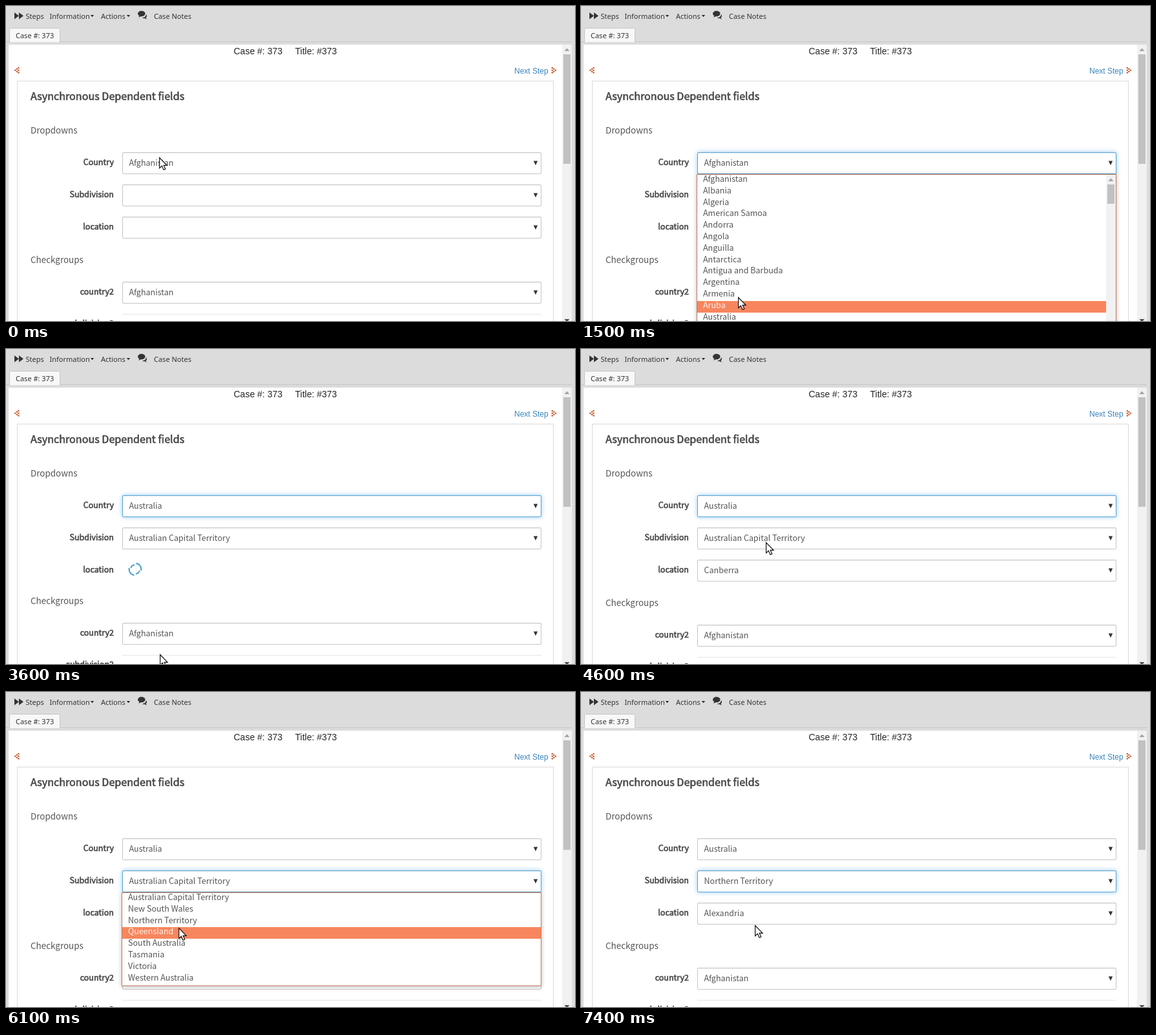
Write an HTML page that moves like this. It is 881x489 px and loops after 7800 ms.

```html
<!DOCTYPE html>
<html lang="en">
<head>
<meta charset="utf-8">
<title>Dependent fields</title>
<style>
  html, body { margin: 0; width: 100%; height: 100%; overflow: hidden; background: #dcdcdc; }
  svg { display: block; width: 881px; height: 489px; }
  text { white-space: pre; }
  .menu { font: 11px "Noto Sans", "Open Sans", sans-serif; fill: #333; }
  .head { font: 14px "Liberation Sans", Arial, sans-serif; fill: #262626; }
  .link { font: 12px "Liberation Sans", Arial, sans-serif; fill: #3c86bd; }
  .form, .bold { font-family: "Noto Sans CJK JP", "Noto Sans CJK SC", "Noto Sans CJK TC", "Noto Sans CJK KR", "Noto Sans CJK", sans-serif; }
  .form { font-size: 12.54px; fill: #555; }
  .group { font-size: 13.44px; }
  .bold { font-size: 12.54px; fill: #464646; stroke: #464646; stroke-width: .6px; }
  .title { font-size: 16.12px; }
  .lit { fill: #fff0ea; }
</style>
</head>
<body>
<svg id="stage" viewBox="0 0 881 489" xmlns="http://www.w3.org/2000/svg"></svg>
<script>
const LOOP = 7800, STEP = 100;
const stage = document.getElementById('stage');

const countries = ['Afghanistan', 'Albania', 'Algeria', 'American Samoa', 'Andorra', 'Angola', 'Anguilla',
  'Antarctica', 'Antigua and Barbuda', 'Argentina', 'Armenia', 'Aruba', 'Australia', 'Austria'];
const regions = ['Australian Capital Territory', 'New South Wales', 'Northern Territory', 'Queensland',
  'South Australia', 'Tasmania', 'Victoria', 'Western Australia'];

// [time, x, y]
const pointer = [
  [0, 237, 235], [900, 237, 235], [1000, 236, 260], [1100, 235, 301], [1300, 239, 385], [1500, 243, 452],
  [1700, 242, 465], [2100, 238, 474], [3900, 238, 474], [4000, 241, 462], [4200, 258, 398], [4400, 277, 330],
  [4600, 286, 300], [5400, 286, 300], [5500, 284, 308], [5700, 275, 343], [5900, 268, 364], [6000, 268, 364],
  [6100, 267, 366], [6200, 269, 362], [LOOP, 269, 362]
];
// [time, value], held until the next entry; null means loading
const country = [[0, 'Afghanistan'], [2600, 'Australia']];
const region = [[0, ''], [2600, null], [3400, regions[0]], [6400, regions[2]]];
const place = [[0, ''], [2600, null], [4400, 'Canberra'], [6400, null], [7400, 'Alexandria']];
const countryGlow = [[0, 0], [700, .6], [800, 1], [5000, .4], [5200, 0]];
const regionGlow = [[0, 0], [5000, .7], [5200, 1]];
const menuOpen = [[0, ''], [700, 'country'], [2600, ''], [5000, 'region'], [6400, '']];
const litRow = [[0, 0], [1000, 1], [1100, 3], [1200, 5], [1300, 8], [1400, 10], [1500, 11], [2000, 12],
  [5000, 0], [5600, 1], [5800, 2], [5900, 3], [6200, 2]];
const spins = [2700, 2900, 3000, 3100, 3200, 3300, 3400, 3500, 3600, 3700, 3800, 4000, 4100, 4200, 4300,
  6600, 6700, 6800, 7000];

const held = (track, t) => track.filter(k => k[0] <= t).pop()[1];

function pointerAt(t) {
  const i = pointer.findIndex(k => k[0] > t);
  const [t0, x0, y0] = pointer[i - 1], [t1, x1, y1] = pointer[i];
  const p = (t - t0) / (t1 - t0);
  return [Math.round(x0 + (x1 - x0) * p), Math.round(y0 + (y1 - y0) * p)];
}

const rect = (x, y, w, h, fill, extra = '') =>
  `<rect x="${x}" y="${y}" width="${w}" height="${h}" fill="${fill}" ${extra}/>`;
const path = (d, fill, extra = '') => `<path d="${d}" fill="${fill}" ${extra}/>`;
const text = (x, y, s, cls, extra = '') => `<text x="${x}" y="${y}" class="${cls}" ${extra}>${s}</text>`;
const label = (y, s) => text(167, y, s, 'bold', 'text-anchor="end"');

function dots(x, y, dir) {
  const spots = [[0, 0], [2.7, -2], [2.7, 2], [5.2, -3.7], [5.2, 0], [5.2, 3.7]];
  return spots.map(([dx, dy]) =>
    `<circle cx="${x + dir * dx}" cy="${y + dy}" r="1.25" fill="#c4582c"/>`).join('');
}

function selectBox(y, value, glow = 0) {
  const box = (stroke, extra = '') => rect(180.5, y + .5, 648, 33, '#fff', `rx="1.5" stroke="${stroke}" ${extra}`);
  return box('#c6c6c6') +
    (glow ? box('#5aa5d4', `opacity="${glow}" style="filter:drop-shadow(0 0 3.5px rgba(90,170,235,.65))"`) : '') +
    rect(181, y + 1, 647, 1, 'rgba(0,0,0,.05)') +
    text(190.5, y + 21, value, 'form') +
    path(`M816.8 ${y + 13.5}h6.4l-3.2 6.8z`, '#333');
}

function spinner(y, angle) {
  const arcs = 'M1.5 -9.3A9.4 9.4 0 0 1 9.2 2M-1.5 9.3A9.4 9.4 0 0 1 -9.2 -2' +
    'M-6.8 -2A7.1 7.1 0 0 1 -1 -7M6.8 2A7.1 7.1 0 0 1 1 7';
  return path(arcs, 'none', `stroke="#459fc6" stroke-width="1.9" transform="translate(200 ${y}) rotate(${angle})"`);
}

function dropdown(top, items, lit, scrolls) {
  const height = scrolls ? 260 : 144.5;
  const width = scrolls ? 633 : 648;
  let out = rect(179.5, top + .5, 649, height, '#fff',
    'stroke="#c9795a" style="filter:drop-shadow(0 1px 3px rgba(0,0,0,.28))"');
  out += items.map((name, i) => {
    const on = i === lit;
    return (on ? rect(180, Math.round(top + 1 + 17.8 * i), width, 18, '#f7865e') : '') +
      text(189, Math.round(top + 12 + 17.8 * i), name, on ? 'form lit' : 'form');
  }).join('');
  if (scrolls) {
    out += rect(813, top + 1, 15, 240, '#f1f1f1') + rect(815, top + 16, 11, 30, '#c1c1c1') +
      path(`M816.5 ${top + 11}h8l-4 -4.5z`, '#a3a3a3');
  }
  return out;
}

const chrome =
  rect(0, 0, 881, 489, '#dcdcdc') +
  path('M13 10l7 5.2l-7 5.2zM20 10l7 5.2l-7 5.2z', '#333') +
  text(30.5, 20, 'Steps', 'menu') + text(67.5, 20, 'Information', 'menu') +
  path('M130.8 14h5.4l-2.7 3zM186.8 14h5.4l-2.7 3z', '#222') +
  text(147, 20, 'Actions', 'menu') + text(229, 20, 'Case Notes', 'menu') +
  path('M211 18.2q5 0 6.2 -5.2q2 3 -.6 5.2q.4 1.4 1.6 2.3q-2.2 0 -3.4 -1.4q-2.4 .2 -3.8 -.9z', '#333') +
  path('M204 11.8a5.8 4.3 0 1 1 5 4.3q-1.8 1.4 -4 1.4q1.2 -1 1.3 -2.2q-2.3 -1.3 -2.3 -3.5z', '#333') +
  rect(0, 55, 876, 1, '#c6c6c6') +
  path('M5.5 56v-19.500q0 -2 2 -2h74q2 0 2 2v19.500', '#f8f8f8', 'stroke="#c6c6c6"') +
  text(15, 50, 'Case #: 373', 'menu') +
  rect(4, 60, 857, 429, '#fff') +
  text(352.5, 75, 'Case #: 373', 'head') + text(447.5, 75, 'Title: #373', 'head') +
  dots(14.3, 99.7, 1) + dots(851, 99.7, -1) + text(787, 105, 'Next Step', 'link') +
  rect(17.5, 116.5, 830, 400, '#fff', 'stroke="#dadada"') +
  text(38, 146, 'Asynchronous Dependent fields', 'bold title') +
  text(38, 198, 'Dropdowns', 'form group') +
  label(247, 'Country') + label(297, 'Subdivision') +
  rect(861, 60, 15, 429, '#f1f1f1') +
  path('M864.5 70h8l-4 -4.500z', '#a3a3a3') + path('M864.5 486h8l-4 4.500z', '#505050');

function scene(t) {
  const regionValue = held(region, t), placeValue = held(place, t);
  const angle = spins.filter(s => s <= t).length * 40;
  // a loading row is 3px shorter than a filled one
  const up1 = regionValue === null ? 3 : 0;
  const up2 = up1 + (placeValue === null ? 3 : 0);
  const open = held(menuOpen, t), lit = held(litRow, t);
  const [px, py] = pointerAt(t);
  let out = chrome + rect(863, 75, 11, up2 === 6 ? 171 : 170, '#c1c1c1');
  out += selectBox(227, held(country, t), held(countryGlow, t));
  out += regionValue === null ? spinner(292, angle) : selectBox(277, regionValue, held(regionGlow, t));
  out += label(347 - up1, 'location');
  out += placeValue === null ? spinner(342 - up1, angle) : selectBox(327 - up1, placeValue);
  out += text(38, 399 - up2, 'Checkgroups', 'form group');
  out += label(448 - up2, 'country2') + selectBox(428 - up2, 'Afghanistan');
  out += rect(180, 478 - up2, 649, 1, '#e6e6e6') + label(497 - up2, 'subdivision2');
  if (open === 'country') out += dropdown(261, countries, lit, true);
  if (open === 'region') out += dropdown(311, regions, lit, false);
  out += path('M.7 .5v16.200l3.700 -3.400l2.700 6l2.700 -1.200l-2.600 -5.800h4.900z', '#fff',
    `stroke="#111" stroke-width="1.2" transform="translate(${px} ${py})"`);
  return out;
}

let shown = -1;
const start = performance.now();
function tick() {
  const t = Math.floor((performance.now() - start) % LOOP / STEP) * STEP;
  if (t !== shown) {
    stage.innerHTML = scene(t);
    shown = t;
  }
  requestAnimationFrame(tick);
}
tick();
</script>
</body>
</html>
```
